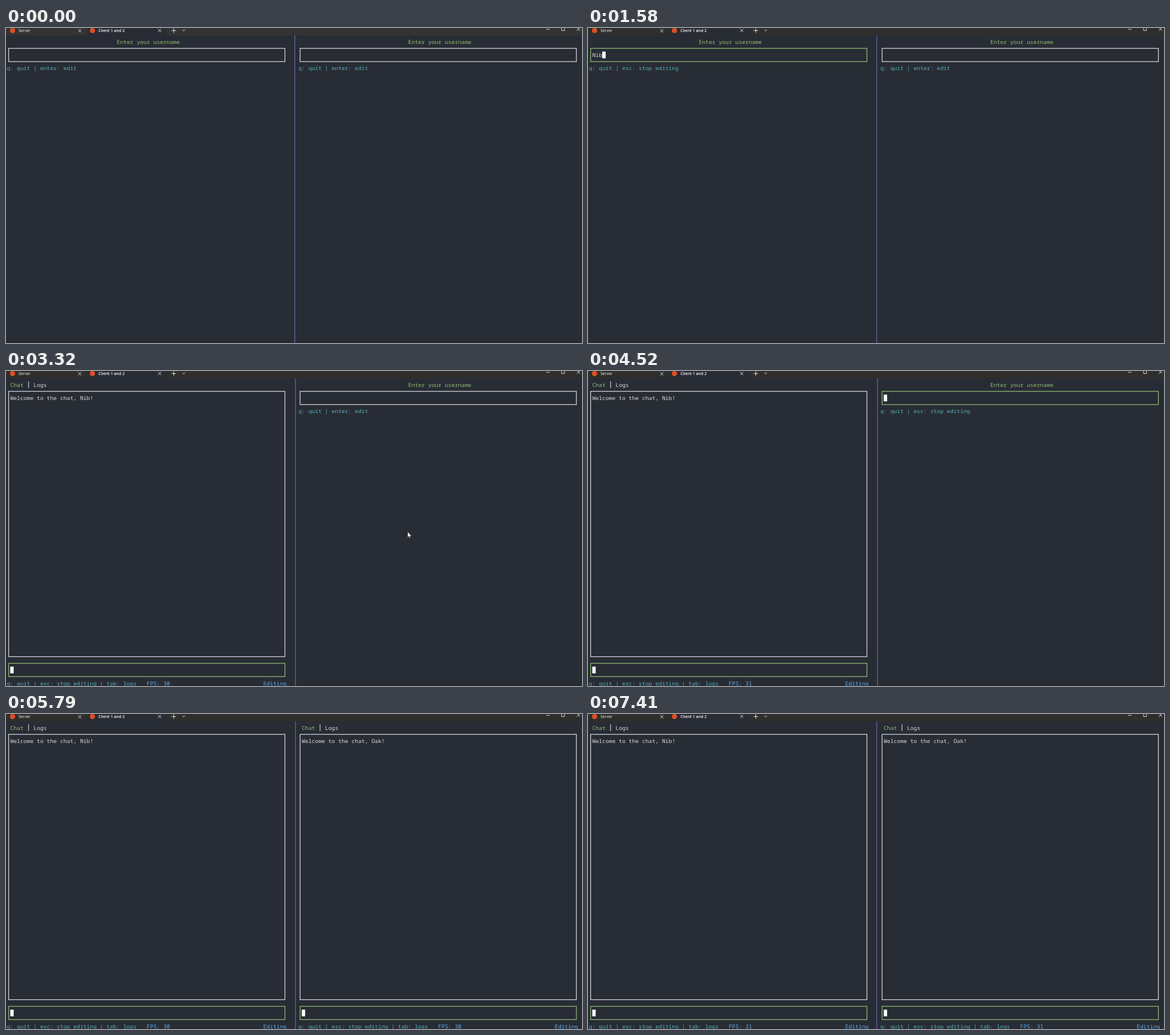
Animation of 1011x554 px, one loop 8 s. Source, as an HTML page:

```html
<!DOCTYPE html>
<html lang="en">
<head>
<meta charset="utf-8">
<title>Terminal chat</title>
<style>
  html, body { margin: 0; width: 100%; height: 100%; overflow: hidden; background: #282c34; }
  svg { display: block; width: 1011px; height: 554px; }
  text { white-space: pre; }
  .term { font: 500 9.738px "Noto Sans Mono", "DejaVu Sans Mono", monospace; }
  .tab { font: 7px "Open Sans", "Noto Sans", sans-serif; fill: #fff; }
  .bold { font-weight: 600; }
  .glyph { fill: none; stroke: #f2f2f2; stroke-width: .9; }
</style>
</head>
<body>
<svg viewBox="0 0 1011 554">
  <rect width="1011" height="554" fill="#282c34"/>
  <rect y="553" width="1011" height="1" fill="#25242f"/>
  <rect id="bar" width="1011" height="13"/>
  <rect x="142" width="140" height="13" fill="#282c34"/>
  <circle cx="11.5" cy="4.4" r="4.6" fill="#dd4f22"/>
  <circle cx="151.7" cy="4.4" r="4.6" fill="#dd4f22"/>
  <text class="tab" x="22" y="7.4">Server</text>
  <text class="tab bold" x="162.3" y="7.4">Client 1 and 2</text>
  <path class="glyph" d="M126.7 2l5.6 5.6m0-5.6l-5.6 5.6M267 1.5l5.6 5.6m0-5.6l-5.6 5.6
    M290.5 4.5h8m-4-4v8M309.5 3l2.4 2.2 2.4-2.2M948 2.3h6M975.2-1h5v5.5h-5zM1002-.8l5.6 5.6m0-5.6l-5.6 5.6"/>
  <rect id="divider" y="13" width="1.2" height="541" fill="#6d6bb0"/>
  <g id="panes" class="term"></g>
  <path id="pointer" fill="#fff" stroke="#15171c" stroke-width=".5"
    d="M0 0V9.6L2.2 7.6 3.7 10.9 5.2 10.3 3.8 7.1H6.7Z"/>
</svg>
<script>
const LOOP = 8000, COL = 5.843, ROW = 11.667;
const WHITE = '#d9dce1', GREEN = '#94bd77', CYAN = '#54b0bb', BLUE = '#60abe9';
const byId = id => document.getElementById(id);

const clients = [
  { left: 1.6, name: 'Nib', edit: 920, keys: [1250, 1450, 1580], join: 2250,
    fps: [[2250, 31], [3088, 30], [4450, 31], [5390, 30], [7410, 31]] },
  { left: 513.2, name: 'Oak', edit: 4520, keys: [5190, 5390, 5460], join: 5790,
    fps: [[5790, 30], [7340, 31]] }
];

// Each move: start, end, frame count, points of a quadratic curve, time of hiding
const moves = [
  { from: 70, to: 400, frames: 6, path: [[834, 519], [560, 430], [331, 354]], hide: 860 },
  { from: 2780, to: 3320, frames: 8, path: [[336, 353], [520, 330], [705, 283]], hide: 4380 },
  { from: 6320, to: 6810, frames: 8, path: [[700, 282], [380, 215], [180, 355]], hide: 7270 }
];

const midY = row => 24.1 + row * ROW;

function text(left, col, row, fill, str) {
  return `<text x="${left + col * COL}" y="${midY(row) + 3.4}" fill="${fill}">${str}</text>`;
}

function frame(left, top, bottom, color) {
  return `<rect x="${left + 3}" y="${midY(top)}" width="${83 * COL}" height="${(bottom - top) * ROW}"
    fill="none" stroke="${color}" stroke-width="1.25"/>`;
}

function block(left, col, row) {
  return `<rect x="${left + col * COL}" y="${midY(row) - 5.9}" width="6" height="11.8" fill="#fff"/>`;
}

function loginScreen({ left, name, edit, keys }, t) {
  const editing = t >= edit;
  const typed = name.slice(0, keys.filter(k => t >= k).length);
  return text(left, 33, 0, GREEN, 'Enter your username')
    + frame(left, 1, 3, editing ? GREEN : WHITE)
    + text(left, 1, 2, WHITE, typed)
    + (editing ? block(left, 1 + typed.length, 2) : '')
    + text(left, 0, 4, CYAN, editing ? 'q: quit | esc: stop editing' : 'q: quit | enter: edit');
}

function chatScreen({ left, name, fps }, t) {
  const rate = fps.filter(([at]) => t >= at).pop()[1];
  return text(left, 1, 0, GREEN, 'Chat')
    + `<rect x="${left + 6.5 * COL - .5}" y="18" width="1.1" height="12" fill="${WHITE}"/>`
    + text(left, 8, 0, WHITE, 'Logs')
    + frame(left, 1, 41, WHITE)
    + text(left, 1, 2, WHITE, `Welcome to the chat, ${name}!`)
    + frame(left, 42, 44, GREEN)
    + block(left, 1, 43)
    + text(left, 0, 45, CYAN, 'q: quit | esc: stop editing | tab: logs')
    + text(left, 42, 45, BLUE, `FPS: ${rate}`)
    + text(left, 77, 45, BLUE, 'Editing');
}

function pointerAt({ from, to, frames, path: [a, b, c] }, t) {
  const steps = frames - 1;
  const p = Math.min(steps, Math.floor((t - from) / (to - from) * steps + 1e-6)) / steps;
  const u = p * p * (3 - 2 * p);
  return a.map((v, i) => (1 - u) ** 2 * v + 2 * u * (1 - u) * b[i] + u * u * c[i]);
}

function render(t) {
  byId('bar').setAttribute('fill', t < 400 ? '#333333' : '#2e2e2c');
  byId('divider').setAttribute('x', t >= 3320 && t < 6810 ? 507.5 : 506.3);
  const panes = clients.map(c => t < c.join ? loginScreen(c, t) : chatScreen(c, t)).join('');
  if (panes !== render.last) byId('panes').innerHTML = render.last = panes;

  const move = moves.find(m => t >= m.from && t < m.hide);
  const pointer = byId('pointer');
  pointer.setAttribute('visibility', move ? 'visible' : 'hidden');
  if (move) pointer.setAttribute('transform', `translate(${pointerAt(move, t)})`);
}

const start = performance.now();
function tick() {
  render((performance.now() - start) % LOOP);
  requestAnimationFrame(tick);
}
tick();
</script>
</body>
</html>
```
